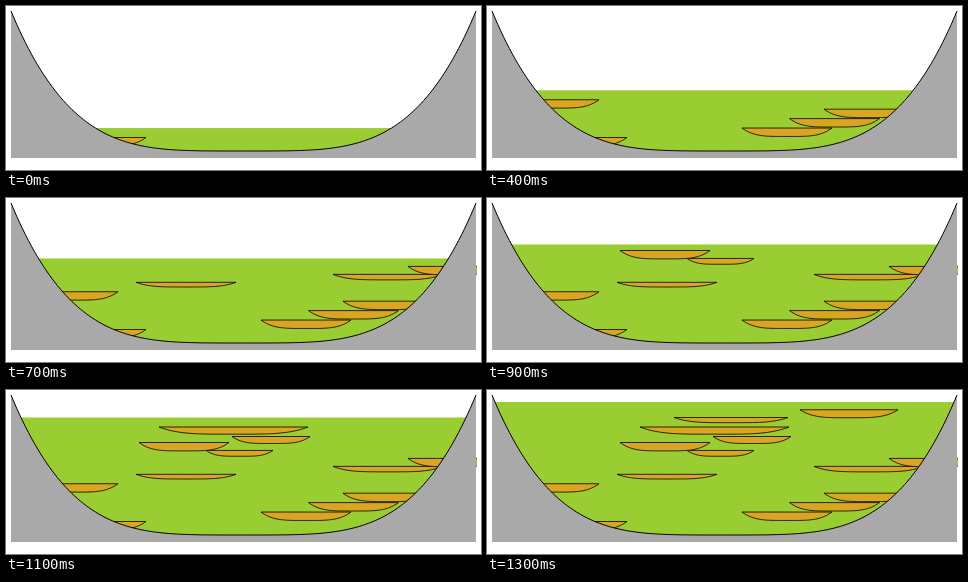
Write an HTML page that moves like this. It is 475 by 164 pixels and loops after 1.4 s.

```html
<!DOCTYPE html>
<html lang="en">
<head>
<meta charset="utf-8">
<title>Valley fill</title>
<style>
  html, body { margin: 0; width: 100%; height: 100%; overflow: hidden; background: #fff; }
  svg { display: block; }
</style>
</head>
<body>
<svg width="475" height="164" viewBox="0 0 475 164">
  <defs><clipPath id="box"><rect x="5" y="5" width="466" height="148"/></clipPath></defs>
  <rect id="fill" x="5" width="465" fill="#9acd32"/>
  <g id="lenses" clip-path="url(#box)" fill="#daa520" stroke="#000" stroke-width="0.8"></g>
  <path id="rock" fill="#a9a9a9"/>
  <path id="valley" fill="none" stroke="#000"/>
</svg>
<script>
const STEP = 100, COUNT = 14, FLOOR = 152;

// Surface height after a number of deposits, straight between key points
const surfaceKeys = [[0, 131.5], [5, 84.3], [9, 52.5], [10, 46.5], [12, 27.5], [COUNT, 12]];

// Channel lenses, oldest first: centre, then width and depth where unusual
const channels = [
  [95], [300], [347.5], [382], [67],
  [180, 100, 4.7], [382, 110, 5.5], [447], [233.5, 67, 5.8], [178],
  [265, 78, 7], [227.5, 149, 7.2], [244, 114, 5.2], [362, 98, 8]
];

const byId = id => document.getElementById(id);

function surface(n) {
  const next = surfaceKeys.findIndex(([at]) => at > n);
  if (next < 0) return surfaceKeys.at(-1)[1];
  const [n0, y0] = surfaceKeys[next - 1], [n1, y1] = surfaceKeys[next];
  return y0 + (y1 - y0) * (n - n0) / (n1 - n0);
}

// Flat-bottomed quartic bowl hanging from its rim
function bowl(centre, width, top, depth, count) {
  const points = Array.from({ length: count + 1 }, (_, i) => {
    const u = 2 * i / count - 1;
    const x = centre + width / 2 * u, y = top + depth * (1 - u ** 4);
    return x.toFixed(2) + " " + y.toFixed(2);
  });
  return "M" + points.join("L");
}

const curve = bowl(237.5, 465, 5, 140, 160);
byId("valley").setAttribute("d", curve);
byId("rock").setAttribute("d", `${curve}V${FLOOR}H5Z`);

const lenses = channels.map(([centre, width = 90, depth = 8.4], i) => {
  const path = document.createElementNS("http://www.w3.org/2000/svg", "path");
  path.setAttribute("d", bowl(centre, width, surface(i), depth, 48) + "Z");
  byId("lenses").append(path);
  return path;
});

function draw(time) {
  const current = Math.floor(time / STEP) % COUNT;
  const level = surface(current + 1);
  byId("fill").setAttribute("y", level);
  byId("fill").setAttribute("height", FLOOR - 1 - level);
  lenses.forEach((lens, i) => lens.setAttribute("display", i <= current ? "inline" : "none"));
}

const start = performance.now();
function tick() {
  draw(performance.now() - start);
  requestAnimationFrame(tick);
}
draw(0);
requestAnimationFrame(tick);
</script>
</body>
</html>
```
